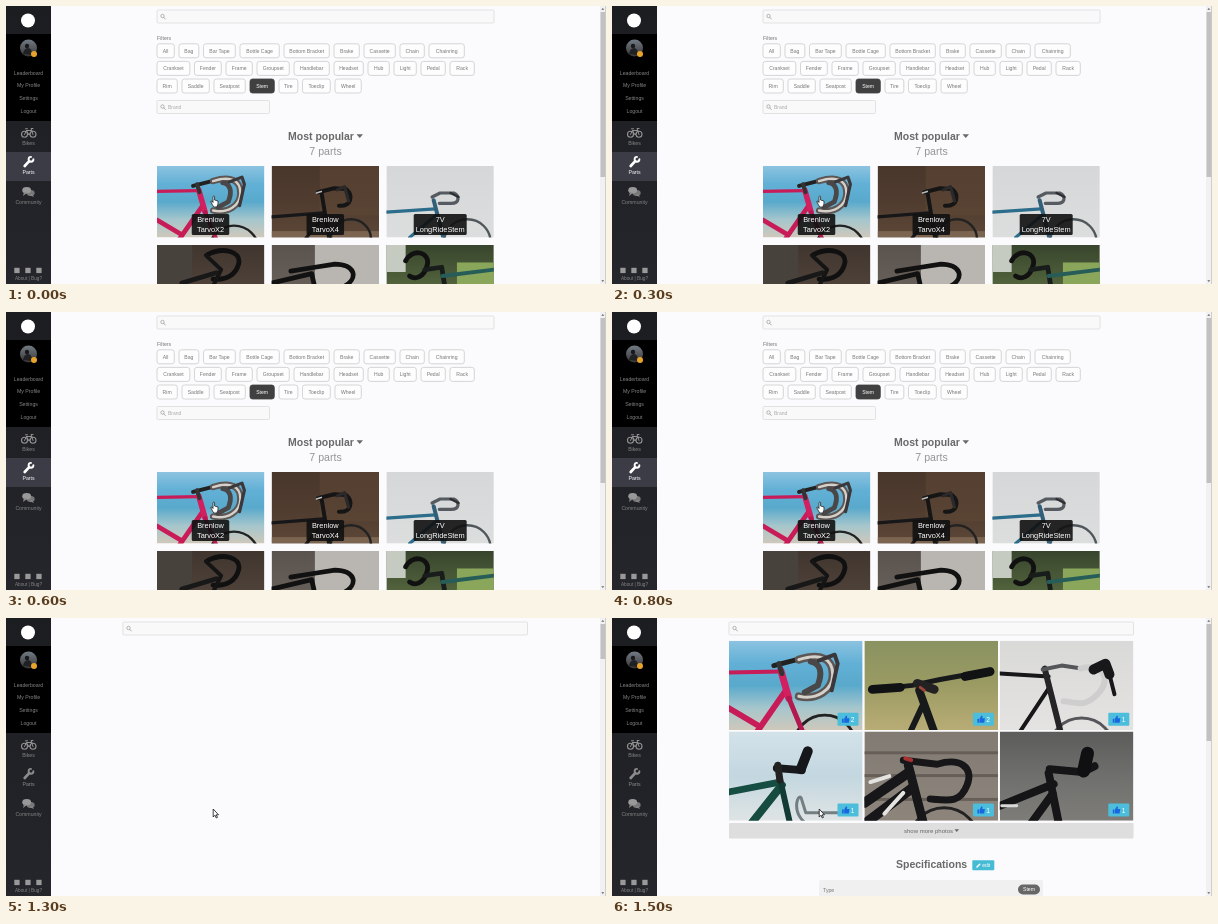
An HTML page that plays this animation: 600x278 px, repeating every 1900 ms.

```html
<!DOCTYPE html>
<html lang="en">
<head>
<meta charset="utf-8">
<title>Bike parts</title>
<style>
  html, body { margin: 0; width: 100%; height: 100%; overflow: hidden; background: #fbfafc; }
  svg { display: block; }
  #stage { width: 100vw; height: 100vh; }
  text { font-family: "Liberation Sans", Arial, sans-serif; white-space: pre; }
</style>
</head>
<body>
<svg id="stage" viewBox="0 0 600 278"></svg>
<script>
const LOOP = 1900;

const text = (x, y, size, value, fill = '#777', more = 'text-anchor="middle"') =>
  `<text x="${x}" y="${y}" font-size="${size}" fill="${fill}" ${more}>${value}</text>`;
const rect = (x, y, w, h, fill, more = '') =>
  `<rect x="${x}" y="${y}" width="${w}" height="${h}" fill="${fill}" ${more}/>`;
const circle = (x, y, r, fill, more = '') =>
  `<circle cx="${x}" cy="${y}" r="${r}" fill="${fill}" ${more}/>`;
const line = (d, color = '#17171a', width = 4) =>
  `<path d="${d}" fill="none" stroke="${color}" stroke-width="${width}" stroke-linecap="round" stroke-linejoin="round"/>`;
const shape = (d, fill) => `<path d="${d}" fill="${fill}"/>`;
const wheel = (x, y, r, color = '#222') => circle(x, y, r, 'none', `stroke="${color}" stroke-width="3"`);
const left = 'text-anchor="start"';

// Photos are composed in a 134 x 90 space and scaled into place.
let gradientCount = 0;
function photo(x, y, w, h, colors, art) {
  const id = 'sky' + gradientCount++;
  const stops = colors.map((c, i) =>
    `<stop offset="${i / (colors.length - 1)}" stop-color="${c}"/>`).join('');
  return `<svg x="${x}" y="${y}" width="${w}" height="${h}" viewBox="0 0 134 90" preserveAspectRatio="none">
    <linearGradient id="${id}" x2="0" y2="1">${stops}</linearGradient>
    ${rect(0, 0, 134, 90, `url(#${id})`)}${art}</svg>`;
}

const seaColors = ['#8cc3e0', '#62b0d6', '#59a9cc', '#a5c6cc', '#cfc8bb'];
const seaBike =
  wheel(96, 106, 31) +
  line('M0 32L52 31', '#c81c58', 4) + line('M57 50L28 92M0 68L30 86', '#c81c58', 6) +
  line('M52 30L60 58', '#d21f5f', 7) + line('M60 58L74 92', '#b3184f', 5) +
  line('M45 25L72 18', '#222', 5) + line('M50 23L53 33', '#333', 5) +
  line('M70 19C92 12 104 18 104 34S88 60 70 56', '#5c5755', 8) +
  line('M70 19C92 12 104 18 104 34S88 60 70 56', '#d6d0cb', 3) +
  line('M82 21C92 23 94 32 89 45L76 52', '#4a4748', 6) +
  line('M90 20L106 14L109 23L103 50', '#3a383a', 4);

const wallBike =
  rect(60, 0, 74, 62, '#604837', 'opacity=".5"') + rect(0, 82, 134, 8, '#7c6550') + wheel(99, 92, 25) +
  line('M0 64L64 59M66 62L42 92') + line('M62 32L72 92', '#151515', 5) +
  line('M58 33L78 28L93 29C102 37 100 51 84 50', '#151515', 5) +
  line('M82 30L91 26L96 44', '#2b2929', 4) + line('M56 34L62 32', '#bbb', 2);

const blueBike =
  wheel(101, 96, 29, '#50575b') +
  line('M0 58L61 54M63 61L29 90', '#2c6d8b', 4) + line('M59 43L71 90', '#315f78', 5) +
  line('M57 39L67 34H84C92 38 91 47 81 47H66', '#555b60', 4) + line('M80 34L90 39', '#2d3033', 3);

const darkBike =
  rect(0, 0, 44, 90, '#48423c') + line('M63 12C83 2 105 8 102 23S85 45 70 43', '#101010', 6) +
  line('M61 13L80 31L64 64', '#141414', 5) + line('M31 48L74 35', '#181818', 6);

const garageBike =
  rect(54, 0, 80, 90, '#b9b6b1') +
  line('M24 33L54 28L79 24C104 24 110 42 89 53', '#111', 6) +
  line('M0 48L50 36L62 90', '#111', 6);

const fieldBike =
  rect(0, 0, 24, 34, '#c6cbc2') + rect(88, 22, 46, 68, '#8aa65a') +
  line('M24 20C32 3 55 9 51 25S36 44 29 39', '#111', 6) +
  line('M48 31L69 28L79 90', '#181d1b', 6) + line('M70 39L134 31', '#275d58', 5);

const grassBike =
  line('M58 66L46 92', '#17191a', 6) + line('M55 50L70 92', '#17191a', 8) +
  line('M10 49L48 45L76 39L126 30', '#18191b', 5) +
  line('M8 49L36 47M101 36L126 31', '#111214', 9) +
  line('M53 43L70 49', '#222', 9) + line('M56 47L60 50', '#a04438', 3);

const whiteBike =
  wheel(82, 111, 33, '#55555a') +
  line('M0 33L49 36M49 48L20 92') + line('M45 28L61 92', '#252528', 6) +
  line('M43 29L62 25L82 28', '#55565a', 4) +
  line('M81 28C102 22 113 38 99 53S78 62 64 61', '#cfcece', 6) +
  line('M94 29L106 23L110 34', '#18181b', 10) + line('M110 34L115 54', '#18181b', 4);

const greenBike =
  line('M76 92C61 78 71 59 73 69L77 82H116', '#737e83', 3) +
  line('M0 61L51 51', '#174e44', 7) + line('M53 54L23 92', '#164b40', 8) +
  line('M51 47L61 92', '#133b35', 6) + line('M48 37L73 39', '#17191c', 8) +
  line('M72 38L79 20', '#15171b', 10) + line('M49 34L51 49', '#222', 7);

const stepsBike =
  [20, 43, 67].map(y => rect(0, y, 134, 3, '#665e57')).join('') + wheel(80, 112, 35) +
  line('M0 72L45 41M3 91L48 57', '#17171a', 10) + line('M44 34L59 92', '#17171a', 9) +
  line('M39 29L73 33C96 26 110 36 103 54S86 70 66 68', '#17171a', 7) +
  line('M6 51L25 45M20 83L39 62', '#e4e3df', 4) + line('M41 27L47 29', '#a83030', 4);

const blackBike =
  line('M0 75L54 53M53 63L32 92', '#151517', 8) + line('M49 42L59 92', '#151517', 8) +
  line('M50 38L83 41L95 35', '#151517', 8) + line('M84 40L88 22', '#101012', 13) +
  line('M2 75H17', '#d8d8d8', 3);

const searchBox = (x, y, w) =>
  rect(x, y, w, 13, '#f9f9f9', 'rx="1" stroke="#dcdcdc" stroke-width=".8"') +
  circle(x + 5.5, y + 6, 1.7, 'none', 'stroke="#999" stroke-width=".7"') +
  line(`M${x + 6.8} ${y + 7.4}l1.5 1.6`, '#999', .8);

function sidebar() {
  const links = ['Leaderboard', 'My Profile', 'Settings', 'Logout'];
  return `<linearGradient id="panel" x2="0" y2="1"><stop stop-color="#1c1d21"/><stop offset="1" stop-color="#25262b"/></linearGradient>
    <linearGradient id="portrait" x2="0" y2="1"><stop stop-color="#717a84"/><stop offset="1" stop-color="#393635"/></linearGradient>` +
    rect(0, 0, 45, 278, 'url(#panel)') + rect(0, 28, 45, 87, '#000') +
    circle(22, 14.5, 7, '#fff') +
    circle(22.5, 42, 8.5, 'url(#portrait)') + circle(21, 40, 2.2, '#17191c') +
    shape('M17 48Q18 42 22 42T26 49Z', '#202124') + circle(28, 48, 3, '#e9a32b') +
    links.map((s, i) => text(22.5, 68.7 + i * 12.65, 5.2, s, '#858585')).join('') +
    rect(0, 146, 45, 29, '#3b3c46', 'id="active"') +
    line('M18.5 128.5L20.5 124.5L23 129L26 124.5H20.5M27 128.5L25 122.5H27M19.5 122.8H21.5', '#929292', 1) +
    [18.5, 27].map(x => circle(x, 128.3, 3, 'none', 'stroke="#929292" stroke-width="1.1"')).join('') +
    text(22.5, 138.5, 5.2, 'Bikes', '#858585') +
    '<g id="parts">' + line('M18.7 160L23.2 155.2', 'currentColor', 2.7) +
    line('M25 150.9A2.4 2.4 0 1 0 27.4 153.3', 'currentColor', 1.9) +
    text(22.5, 168, 5.2, 'Parts', 'currentColor') + '</g>' +
    '<ellipse cx="24.7" cy="187" rx="4" ry="3" fill="#777"/><ellipse cx="20.7" cy="184.3" rx="4.4" ry="3.3" fill="#999"/>' +
    shape('M18 186L17 190L21 187ZM26 188L28 191L23 189Z', '#888') +
    text(22.5, 197.5, 5.2, 'Community', '#858585') +
    [8.3, 19.3, 30.3].map(x => rect(x, 261.8, 5.3, 5.3, '#999')).join('') +
    text(22.5, 274, 4.7, 'About | Bug?', '#858585');
}

// Each row ends with the left edge an additional pill would have.
const pillRows = [
  ['All,Bag,Bar Tape,Bottle Cage,Bottom Bracket,Brake,Cassette,Chain,Chainring',
    [151, 173, 197.5, 234, 278, 328, 358, 394, 423, 463]],
  ['Crankset,Fender,Frame,Groupset,Handlebar,Headset,Hub,Light,Pedal,Rack',
    [151, 188.5, 220, 251, 288, 328, 362, 388, 415, 444, 473]],
  ['Rim,Saddle,Seatpost,Stem,Tire,Toeclip,Wheel',
    [151, 176, 208, 244, 273, 296.5, 329, 360]]
];
const pills = () => pillRows.map(([names, edges], row) => names.split(',').map((name, i) => {
  const x = edges[i], w = edges[i + 1] - x - 4.7, y = 37.8 + row * 17.6, on = name === 'Stem';
  return rect(x, y, w, 14, on ? '#404040' : '#fdfdfd', `rx="2.5" stroke="${on ? '#404040' : '#ccc'}" stroke-width=".8"`) +
    text(x + w / 2, y + 8.9, 5.1, name, on ? '#fff' : '#777');
}).join('')).join('');

function listPage() {
  const columns = [151, 265.6, 380.4];
  const card = (i, y, colors, art) => photo(columns[i], y, 107.4, 71.5, colors, art);
  const label = (x, w, brand, model) =>
    rect(x - w / 2, 208, w, 21, '#111', 'rx="1.5" opacity=".9"') +
    text(x, 215.6, 7.4, brand, '#fff') + text(x, 226, 7.4, model, '#fff');
  return searchBox(151, 4, 337) + text(151, 34.2, 5.2, 'Filters', '#777', left) +
    pills() + searchBox(151, 94.5, 112.5) +
    text(162, 102.8, 5, 'Brand', '#aaa', left) +
    text(282, 133.7, 10.5, 'Most popular', '#696969', left + ' font-weight="bold"') +
    shape('M350.5 128.2H357L353.75 132Z', '#696969') +
    text(319.5, 148.8, 10.6, '7 parts', '#959595') +
    card(0, 160, seaColors, seaBike) +
    card(1, 160, ['#49372c', '#503c2f', '#5c4737'], wallBike) +
    card(2, 160, ['#d6d7d8', '#dcdddd'], blueBike) +
    card(0, 239, ['#41362f', '#574a40'], darkBike) +
    card(1, 239, ['#5b534d', '#6f6761'], garageBike) +
    card(2, 239, ['#38452d', '#667b49'], fieldBike) +
    label(204.5, 37.5, 'Brenlow', 'TarvoX2') +
    label(319.3, 37.5, 'Brenlow', 'TarvoX4') +
    label(434.2, 53, '7V', 'LongRideStem');
}

function detailPage() {
  const photos = [
    [seaColors, seaBike, 2],
    [['#899261', '#9b9b63', '#b9ac76'], grassBike, 2],
    [['#d9d9d8', '#e4e3e2'], whiteBike, 1],
    [['#d3e2e9', '#c3d7e0', '#dfe4e4'], greenBike, 1],
    [['#827b73', '#8d857c'], stepsBike, 1],
    [['#5c5d5b', '#6f706d', '#7d7c79'], blackBike, 1]
  ];
  return photos.map(([colors, art, likes], i) => {
    const x = 117 + i % 3 * 135.4, y = 22.8 + Math.floor(i / 3) * 90.7;
    return photo(x, y, 133.6, 89.2, colors, art) +
      rect(x + 108.5, y + 72, 21, 13, '#4cbddb', 'rx="1"') +
      shape(`M${x + 113} ${y + 78}h1.7v4h-1.7zM${x + 115.2} ${y + 78}l1.9-3.2 1.1.7-.4 1.9h2.7l-.7 4.6h-4.6z`, '#1767de') +
      text(x + 123.7, y + 81, 6.7, likes, '#fff');
  }).join('') +
    rect(117, 205, 404.5, 15.5, '#dedede', 'rx="1"') +
    text(292, 214.8, 6, 'show more photos', '#666', left) + shape('M342.5 211.2H347L344.75 214Z', '#666') +
    text(284, 250.4, 10.5, 'Specifications', '#696969', left + ' font-weight="bold"') +
    rect(360.3, 242.3, 22, 10, '#46bcd4', 'rx="1"') + line('M365 249L367.7 246.3', '#fff', 1.5) +
    text(370.2, 249, 5, 'edit', '#fff', left) +
    rect(207, 262, 224, 20, '#f0f0f0', 'rx="2"') + text(211, 273.6, 5.2, 'Type', '#777', left) +
    rect(406, 266.5, 22, 10, '#666', 'rx="5"') + text(417, 273.4, 5.2, 'Stem', '#fff');
}

const scrollbar = () => rect(594, 0, 6, 278, '#f1f1f1') + rect(594.5, 6, 4.7, 35, '#c1c1c1', 'id="thumb"') +
  shape('M595.3 3.7H598.3L596.8 2ZM595.3 274.3H598.3L596.8 276Z', '#666') + rect(599.5, 0, .5, 278, '#aaa');

const hand = `<path id="hand" d="M206.5 199L204.7 195.5L206 195L207 196.5V190.5Q207.8 189.5 208.6 190.5V194L212 195V198L210.8 201H207.8Z" fill="#fff" stroke="#222" stroke-width=".8"/>`;
const arrow = `<path id="arrow" d="M207.2 191V199L209 197.2L210.3 200L211.5 199.4L210.2 196.8H212.5Z" stroke="#111" stroke-width=".8"/>`;

const byId = id => document.getElementById(id);
byId('stage').innerHTML = rect(0, 0, 600, 278, '#fbfafc') +
  `<g id="list">${listPage()}</g><g id="detail">${detailPage()}</g>
   <g id="search">${searchBox(117, 4, 404.5)}</g>` + sidebar() + scrollbar() + hand + arrow;

const nodes = Object.fromEntries(
  ['list', 'detail', 'search', 'active', 'parts', 'thumb', 'hand', 'arrow'].map(id => [id, byId(id)]));
const show = (node, visible) => node.setAttribute('display', visible ? 'inline' : 'none');

function draw(time) {
  const listing = time < 900, loaded = time >= 1400;
  for (const id of ['list', 'active', 'hand']) show(nodes[id], listing);
  for (const id of ['search', 'arrow']) show(nodes[id], !listing);
  show(nodes.detail, loaded);
  nodes.detail.setAttribute('opacity', time < 1500 ? .5 : 1);
  nodes.parts.setAttribute('color', listing ? '#fff' : '#8c8c8c');
  nodes.thumb.setAttribute('height', listing ? 165 : loaded ? 117 : 35);
  nodes.arrow.setAttribute('fill', time < 1200 ? '#555' : '#fff');
}

const start = performance.now();
function tick() {
  draw((performance.now() - start) % LOOP);
  requestAnimationFrame(tick);
}
tick();
</script>
</body>
</html>
```
